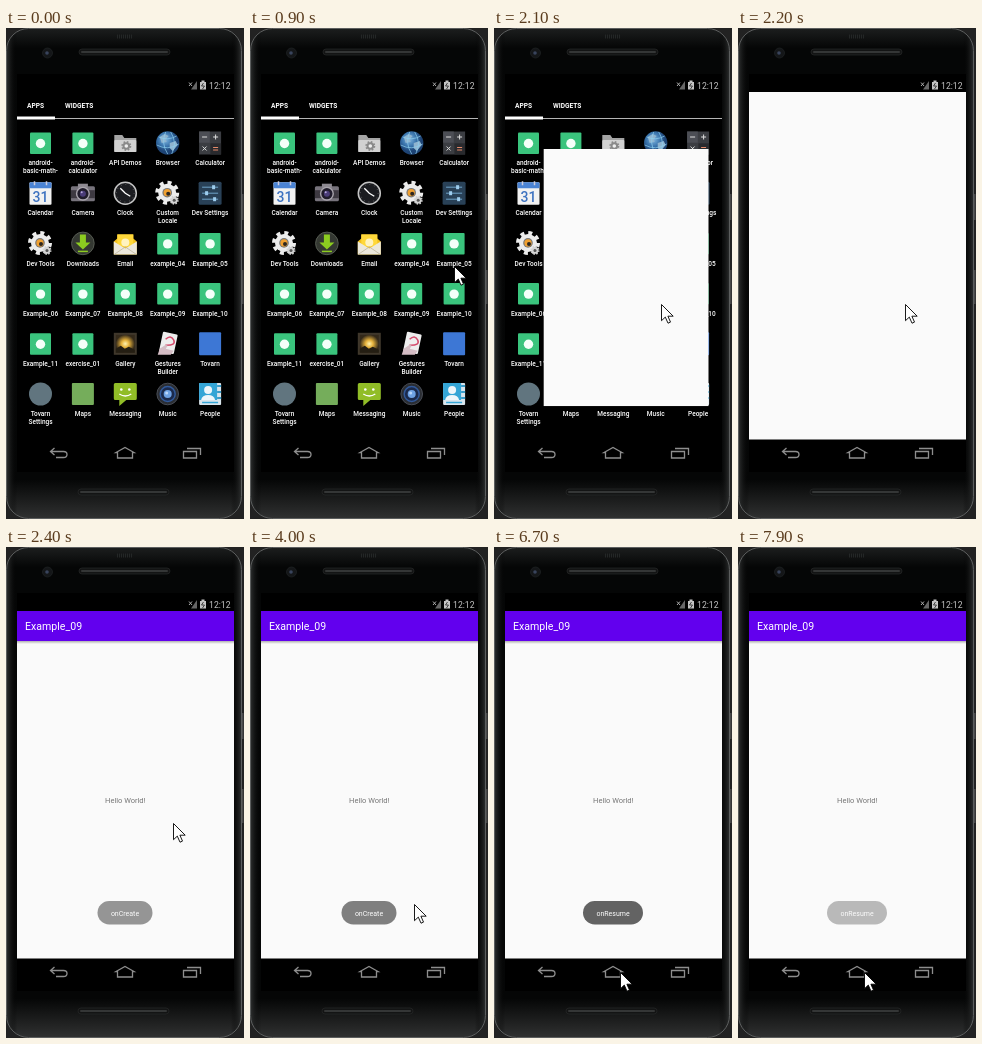
These frames come from a looping animation (238 by 491 pixels, 8 s). An HTML page:

```html
<!DOCTYPE html>
<html lang="en">
<head>
<meta charset="utf-8">
<title>Activity lifecycle</title>
<style>
html, body { margin: 0; width: 100%; height: 100%; overflow: hidden; background: #000; }
svg { display: block; width: 100%; height: 100%; }
text { font-family: Roboto, "Noto Sans", sans-serif; }
.label { font-size: 6.5px; font-weight: 500; fill: #fff; text-anchor: middle; }
.tab { font-size: 6.6px; font-weight: 700; fill: #fff; }
</style>
</head>
<body>
<svg viewBox="0 0 238 491" preserveAspectRatio="none">
  <defs>
    <linearGradient id="fade" x2="0" y2="1">
      <stop stop-color="#000" stop-opacity=".3"/><stop offset="1" stop-color="#000" stop-opacity="0"/>
    </linearGradient>
    <linearGradient id="body" x2="0" y2="1">
      <stop stop-color="#1c1e1e"/><stop offset=".04" stop-color="#050606"/>
      <stop offset=".92" stop-color="#050606"/><stop offset="1" stop-color="#303131"/>
    </linearGradient>
    <linearGradient id="sides">
      <stop stop-color="#2e3030"/><stop offset=".045" stop-color="#000" stop-opacity="0"/>
      <stop offset=".955" stop-color="#000" stop-opacity="0"/><stop offset="1" stop-color="#2e3030"/>
    </linearGradient>
    <radialGradient id="sunset" cx=".5" cy=".5">
      <stop stop-color="#fff3b0"/><stop offset=".4" stop-color="#e6b23c"/><stop offset="1" stop-color="#33291a"/>
    </radialGradient>
    <radialGradient id="sea" cx=".4" cy=".35">
      <stop stop-color="#7fb6e0"/><stop offset=".6" stop-color="#3a74ac"/><stop offset="1" stop-color="#1d4374"/>
    </radialGradient>
  </defs>

  <g id="phone">
    <rect width="238" height="491" fill="#222"/>
    <path d="M236.500 166v26M236.500 242v34" stroke="#4a4a4a" stroke-width="2"/>
    <rect x=".5" y=".5" width="235" height="490" rx="22" fill="url(#body)"/>
    <rect x=".5" y=".5" width="235" height="490" rx="22" fill="url(#sides)" stroke="#5c5e5e"/>
    <rect x="11" y="46" width="217" height="398" fill="#000"/>
    <rect x="73" y="21" width="91" height="6" rx="3" fill="#131414" stroke="#272929" stroke-width=".7"/>
    <rect x="75" y="23" width="87" height="2" rx="1" fill="#343636"/>
    <rect x="72" y="461" width="91" height="6" rx="3" fill="#131414" stroke="#272929" stroke-width=".7"/>
    <rect x="74" y="463" width="87" height="2" rx="1" fill="#343636"/>
    <path d="M111 8.500h15" stroke="#242727" stroke-width="4" stroke-dasharray="1 1"/>
    <circle cx="41.500" cy="25" r="5" fill="#141618" stroke="#212426" stroke-width=".7"/>
    <circle cx="41" cy="25" r="1.800" fill="#39445c"/>
  </g>

  <g id="launcher">
    <text class="tab" x="21" y="80">APPS</text>
    <text class="tab" x="59" y="80">WIDGETS</text>
    <path d="M11 90.500h217" stroke="#b4b4b4"/>
    <path d="M11 90h38" stroke="#fff" stroke-width="3"/>
    <g id="apps"></g>
  </g>

  <rect id="sheet" fill="#fafafa"/>
  <g id="activity">
    <rect x="11" y="94" width="217" height="3" fill="url(#fade)"/>
    <rect x="11" y="64" width="217" height="30" fill="#6200ee"/>
    <text x="19" y="82.700" font-size="10.600" fill="#fff">Example_09</text>
    <text x="119.300" y="255.500" font-size="7.500" fill="#757575" text-anchor="middle">Hello World!</text>
  </g>
  <g id="toast">
    <rect id="pill" y="354" height="23.500" rx="11.750" fill="#636363"/>
    <text id="note" x="119" y="368.800" font-size="7" fill="#fff" text-anchor="middle"></text>
  </g>

  <g id="bars" fill="none" stroke="#8e8e8e" stroke-width="1.300">
    <path d="M191 53v8.500h-6z" fill="#666" stroke="none"/>
    <path d="M183 54.500l3 3.500m0-3.500l-3 3.500" stroke="#aaa" stroke-width="1"/>
    <path d="M194 54h1.500v-1.500h3V54h1.500v7.500h-6z" fill="#c4c4c4" stroke="none"/>
    <path d="M197.500 55l-2 3h3l-2 3" stroke="#222" stroke-width=".8"/>
    <text x="224.500" y="60.700" font-size="8.600" fill="#c4c4c4" stroke="none" text-anchor="end">12:12</text>
    <path d="M48.500 420l-4 3.500 4 3.500M45 423.500h12.500q3.500 0 3.500 3t-3.500 3H50"/>
    <path d="M110 424.500l9-5 9 5h-1.500v5.500h-15v-5.500z"/>
    <path d="M177.500 423.500h13v6.500h-13zM181 420.500h13.500v6.500"/>
  </g>
  <path id="cursor" d="M.5 .5V16.700L4.300 13.100 7 19.200 9.500 18.100 6.900 12.200H12.200z" fill="#fff" stroke="#000" stroke-width=".9"/>
</svg>

<script>
const $ = id => document.getElementById(id);
const LOOP = 8000, STEP = 100;

// Icons are drawn around 0,0 inside a 24 px box.
const box = (x, y, w, h, fill, more = '') => `<rect x="${x}" y="${y}" width="${w}" height="${h}" fill="${fill}" ${more}/>`;
const dot = (x, y, r, fill, more = '') => `<circle cx="${x}" cy="${y}" r="${r}" fill="${fill}" ${more}/>`;
const line = (d, color, width = 1, fill = 'none') => `<path d="${d}" stroke="${color}" stroke-width="${width}" fill="${fill}"/>`;
const shape = (d, fill) => `<path d="${d}" fill="${fill}"/>`;
const gear = (x, y, r, fill) =>
  dot(x, y, r * .75, fill) + dot(x, y, r * .8, 'none', `stroke="${fill}" stroke-width="${r * .4}" stroke-dasharray="${r * .314}"`);

const icons = {
  app: box(-10.5, -10.5, 21, 21.5, '#3ac47d', 'rx="1"') + dot(0, .5, 4.7, '#f4fff9'),
  demos: shape('M-11-8h8l2 3h12v14h-22z', '#a4a4a4') + box(-11, -3, 22, 12, '#d2d2d2', 'rx="1"') + gear(1, 3, 5, '#8a8a8a') + dot(1, 3, 1.8, '#eee'),
  browser: dot(0, 0, 11.7, 'url(#sea)') + shape('M-8-6l5-3 4 2-3 3 1 3-5 1zM2 0l6-2 2 4-5 6-3-3z', '#8fb4cf') +
    line('M-11 2Q0 8 11 1M-9-6Q0-2 9-7M-2-11Q-7 0 0 11M3-11Q10 0 4 11', '#8ed0f0', .7),
  calc: box(-11, -11.5, 22, 23, '#3b3d42') + box(-11, -11.5, 10.7, 11.2, '#4c4e55') + box(.3, .3, 10.7, 11.2, '#292a2e') +
    line('M-8-6h5M3-6h5M5.500-8.500v5M-7.500 3.500l4 4m0-4l-4 4', '#ddd') + line('M3 4.500h5M3 7h5', '#e58a6a'),
  calendar: box(-11, -11, 22, 22.5, '#f2f2f2', 'rx="1"') + box(-11, -11, 22, 6, '#4a83d4', 'rx="1"') +
    line('M-6-12v4M6-12v4', '#ccd', 1.5) + '<text y="8.500" font-size="14" font-weight="500" fill="#3d72c0" text-anchor="middle">31</text>',
  camera: box(-12, -7, 24, 15, '#77737c', 'rx="1.500"') + box(-5, -9.5, 10, 4, '#8e8a92') + box(-12, -3, 24, 8, '#3d3941') +
    dot(0, .5, 7, '#aaa6ae') + dot(0, .5, 5.6, '#201c2b') + dot(0, .5, 3, '#4a3c78') + dot(-1.2, -1, 1, '#b7aadd'),
  clock: dot(0, 0, 11, '#1b1c20', 'stroke="#c4c4c4" stroke-width="1.500"') +
    dot(0, 0, 8.8, 'none', 'stroke="#777" stroke-width="1" stroke-dasharray=".7 3.900"') + line('M-5-5L0 0l5 3', '#fff', 1.3),
  cogs: gear(-.5, -.5, 12, '#ececec') + dot(-.5, -.5, 4.8, '#777') + dot(-.5, -.5, 3.6, '#f0a030') + dot(.5, .5, 2, '#2c2620') +
    gear(6.5, 7, 4.5, '#d4d4d4') + dot(6.5, 7, 1.5, '#555'),
  sliders: box(-11.5, -11.5, 23, 23, '#294157', 'rx="1.500"') + line('M-8-6h16M-8 0h16M-8 6h16', '#6fa4ca') +
    box(2, -8, 3, 4, '#9dcdee') + box(-5, -2, 3, 4, '#9dcdee') + box(3, 4, 3, 4, '#9dcdee'),
  downloads: dot(0, 0, 11.3, '#343832', 'stroke="#565b52" stroke-width="1"') + shape('M-3-9h6v8h4.500L0 6-7.500-1H-3z', '#8ccc20') + line('M-5 8h10', '#8ccc20', 1.5),
  email: shape('M-11.500-2L-8-5V-9H8v4l3.500 3V11h-23z', '#f2c01e') + box(-8, -9, 16, 12, '#ffd83a') + dot(0, -1, 4, '#fff3c0') +
    shape('M-11.500-2L0 5 11.500-2V11h-23z', '#ece8dc') + line('M-11 11L0 3.500 11 11', '#bdb59d', .8),
  gallery: box(-11.5, -11, 23, 22, '#3f372b') + box(-9.5, -9, 19, 18, 'url(#sunset)') + shape('M-9.500 9v-4l5-3 4 3 4-2 6 3v3z', '#241e13'),
  gestures: '<g transform="rotate(12)">' + box(-7, -11, 15, 20, '#eee', 'rx="1"') + line('M-3-4Q1-10 5-5T-2 2', '#d44c6c', 1.5) + '</g>' +
    shape('M-10 11l2-6 6-4 2 1-2 3 8 2-3 4z', '#d4bcc4'),
  search: box(-11, -11.5, 22, 23, '#3d77d5', 'rx="1"'),
  gears: dot(0, 0, 11.5, '#61757f'),
  maps: box(-11, -11, 22, 22, '#75ad5b', 'rx="1"'),
  messaging: shape('M-10-11h20q1.500 0 1.500 1.500v14q0 1.500-1.500 1.500H1l-7 6V6h-4q-1.500 0-1.500-1.500v-14Q-11.500-11-10-11z', '#91bd27') +
    dot(-4, -4.5, 1.3, '#fff') + dot(4, -4.5, 1.3, '#fff') + line('M-6 0Q0 4 6 0', '#fff', 1.4),
  music: dot(0, 0, 10.8, '#2a2d33', 'stroke="#484c54" stroke-width="1"') + dot(0, 0, 7.5, '#1b2a4c', 'stroke="#31599a" stroke-width="1.500"') +
    dot(0, 0, 4, '#6ea2e4') + dot(-1, -1, 1.5, '#b9d6fa'),
  people: box(-11, -11, 22, 22, '#d8e4ec', 'rx="1"') + box(-11, -11, 18, 17, '#34a5d6') + dot(-2, -4, 4, '#eef6fa') +
    shape('M-9 6Q-8 1-2 1t7 5z', '#eef6fa') + line('M7-8h4M7-2h4M7 4h4', '#3a9cc8', 2) + line('M-8 8.500h16', '#34a5d6', 1.5),
};

const apps = [
  ['app', 'android-|basic-math-'], ['app', 'android-|calculator'], ['demos', 'API Demos'], ['browser', 'Browser'], ['calc', 'Calculator'],
  ['calendar', 'Calendar'], ['camera', 'Camera'], ['clock', 'Clock'], ['cogs', 'Custom|Locale'], ['sliders', 'Dev Settings'],
  ['cogs', 'Dev Tools'], ['downloads', 'Downloads'], ['email', 'Email'], ['app', 'example_04'], ['app', 'Example_05'],
  ...['06', '07', '08', '09', '10', '11'].map(n => ['app', 'Example_' + n]),
  ['app', 'exercise_01'], ['gallery', 'Gallery'], ['gestures', 'Gestures|Builder'], ['search', 'Tovarn'],
  ['gears', 'Tovarn|Settings'], ['maps', 'Maps'], ['messaging', 'Messaging'], ['music', 'Music'], ['people', 'People'],
];
$('apps').innerHTML = apps.map(([icon, name], i) => {
  const x = 34.5 + i % 5 * 42.4, y = 115 + Math.floor(i / 5) * 50.2;
  const lines = name.split('|').map((s, k) => `<text class="label" y="${22.3 + k * 7.7}">${s}</text>`).join('');
  return `<g transform="translate(${x} ${y})">${icons[icon]}${lines}</g>`;
}).join('');

// [time, x, y]
const path = [
  [100, 219, 113], [300, 188, 215], [500, 160, 268], [700, 182, 256], [900, 204, 238], [1100, 203, 234],
  [1400, 183, 258], [1700, 167, 276], [2500, 167, 276], [2700, 167, 311], [2900, 167, 311], [3100, 167, 346],
  [3900, 167, 346], [4400, 150, 402], [4500, 150, 402], [4600, 149, 403], [4900, 149, 403], [5300, 128, 425],
  [6600, 128, 425], [6700, 126, 425], [LOOP, 126, 425],
];
// text, pill width, fade in start and length, fade out start, end
const toasts = [
  ['onCreate', 55, 2200, 300, 3900, 4200],
  ['onStart', 50, 4200, 200, 5700, 6000],
  ['onResume', 60, 6000, 200, 7600, LOOP],
];

const clamp = v => Math.max(0, Math.min(1, v));
const mix = (a, b, p) => a + (b - a) * p;
const show = (id, on) => $(id).setAttribute('display', on ? 'inline' : 'none');
const set = (id, attrs) => { for (const k in attrs) $(id).setAttribute(k, attrs[k]); };

function pointer(t) {
  const i = path.findIndex(k => k[0] > t), a = path[i - 1], b = path[i];
  const p = (t - a[0]) / (b[0] - a[0]);
  return [mix(a[1], b[1], p), mix(a[2], b[2], p)].map(Math.round);
}

function draw(t) {
  show('cursor', t >= 100);
  if (t >= 100) set('cursor', { transform: `translate(${pointer(t)})` });

  // The window grows out of the tapped cell.
  const p = t < 2000 ? 0 : t < 2100 ? .25 : t < 2200 ? .7 : 1;
  const x = mix(140, 11, p), y = mix(254, 64, p);
  show('sheet', p > 0);
  set('sheet', { x, y, width: mix(183, 228, p) - x, height: mix(300, 411.5, p) - y });
  show('launcher', p < 1);
  show('activity', t >= 2300);

  const toast = toasts.find(([, , start, , , end]) => t >= start && t < end);
  show('toast', toast);
  if (toast) {
    const [text, width, start, rise, out] = toast;
    $('note').textContent = text;
    set('pill', { x: 119 - width / 2, width });
    set('toast', { opacity: Math.min(clamp((t - start) / rise), clamp(1 - (t - out) / 520)) });
  }
}

function tick(now) {
  draw(Math.floor(now % LOOP / STEP) * STEP);
  requestAnimationFrame(tick);
}
draw(0);
requestAnimationFrame(tick);
</script>
</body>
</html>
```
